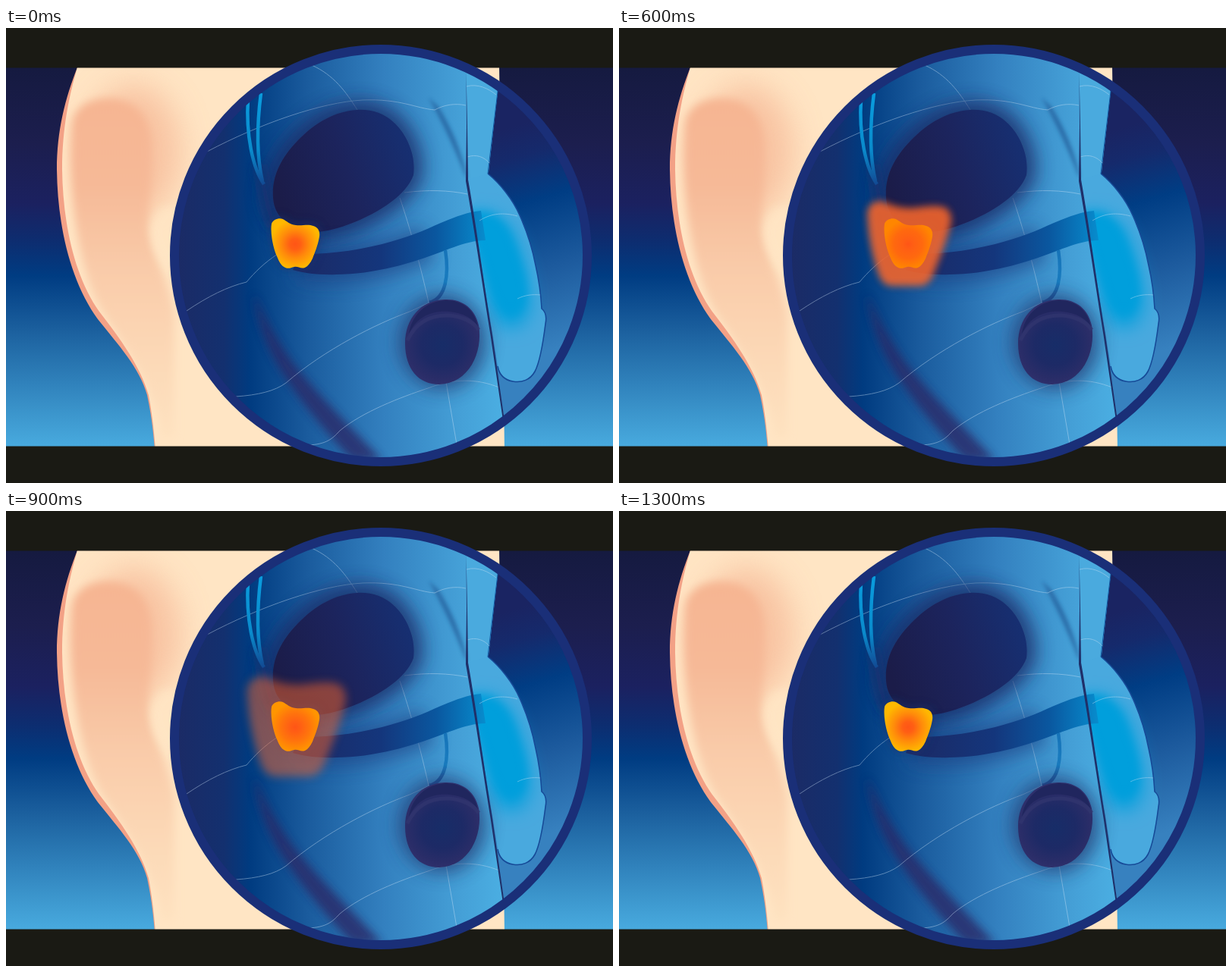
Animation, 800 px wide and 600 px high, one loop 1.4 s. Source, as an HTML page:

```html
<!DOCTYPE html>
<html lang="en">
<head>
<meta charset="utf-8">
<title>Pelvis cross-section</title>
<style>
  html, body { margin: 0; width: 100%; height: 100%; overflow: hidden; background: #1a1a14; }
  svg { display: block; width: 100vw; height: 100vh; }
  .mesh { fill: none; stroke: #cfe4f7; stroke-width: 1; opacity: .42; }
  .halo { transform-origin: 381px 284px; animation: spread 1400ms step-end infinite; }
  .rim { animation: rim 1400ms step-end infinite; }
  .mid { animation: mid 1400ms step-end infinite; }

  /* the halo grows for 700 ms, then fades at full size */
  @keyframes spread {
    0%       { transform: scale(.5);  opacity: 0; }
    7.1429%  { transform: scale(.5);  opacity: .1; }
    14.2857% { transform: scale(.5);  opacity: .2; }
    21.4286% { transform: scale(.52); opacity: .45; }
    28.5714% { transform: scale(.56); opacity: .72; }
    35.7143% { transform: scale(.7);  opacity: .82; }
    42.8571% { transform: scale(.85); opacity: .88; }
    50%      { transform: scale(1);   opacity: .9; }
    57.1429% { transform: scale(1);   opacity: .7; }
    64.2857% { transform: scale(1);   opacity: .5; }
    71.4286% { transform: scale(1);   opacity: .34; }
    78.5714% { transform: scale(1);   opacity: .2; }
    85.7143% { transform: scale(1);   opacity: .09; }
    92.8571%, 100% { transform: scale(1); opacity: 0; }
  }
  @keyframes rim {
    0%       { stop-color: #ffb800; animation-timing-function: steps(4); }
    28.5714% { stop-color: #ff8a00; animation-timing-function: steps(3); }
    50%      { stop-color: #ff8400; animation-timing-function: steps(6); }
    92.8571%, 100% { stop-color: #ffb800; }
  }
  @keyframes mid {
    0%       { stop-color: #ff8c0a; animation-timing-function: steps(4); }
    28.5714% { stop-color: #ff6a10; animation-timing-function: steps(3); }
    50%      { stop-color: #ff680e; animation-timing-function: steps(6); }
    92.8571%, 100% { stop-color: #ff8c0a; }
  }
</style>
</head>
<body>
<svg viewBox="0 0 800 600" preserveAspectRatio="none">
  <defs>
    <linearGradient id="sky" gradientUnits="userSpaceOnUse" x1="0" y1="52" x2="0" y2="551">
      <stop offset="0" stop-color="#151a40"/>
      <stop offset=".2" stop-color="#1c1e4e"/>
      <stop offset=".36" stop-color="#1b2160"/>
      <stop offset=".46" stop-color="#0d2d70"/>
      <stop offset=".55" stop-color="#003c82"/>
      <stop offset=".7" stop-color="#1c619f"/>
      <stop offset="1" stop-color="#48aade"/>
    </linearGradient>
    <linearGradient id="peach" gradientUnits="userSpaceOnUse" x1="0" y1="95" x2="0" y2="540">
      <stop offset="0" stop-color="#f6b592"/>
      <stop offset=".25" stop-color="#f6b997"/>
      <stop offset=".5" stop-color="#f9cba9"/>
      <stop offset=".75" stop-color="#fcd8b6"/>
      <stop offset="1" stop-color="#fee2c0"/>
    </linearGradient>
    <linearGradient id="outside" gradientUnits="userSpaceOnUse" x1="650" y1="135" x2="735" y2="420">
      <stop offset="0" stop-color="#1a2462"/>
      <stop offset=".14" stop-color="#152a6c"/>
      <stop offset=".34" stop-color="#003d84"/>
      <stop offset=".65" stop-color="#1d5b9e"/>
      <stop offset="1" stop-color="#3781bf"/>
    </linearGradient>
    <linearGradient id="inside" gradientUnits="userSpaceOnUse" x1="228" y1="0" x2="650" y2="0">
      <stop offset="0" stop-color="#1b2b66"/>
      <stop offset=".14" stop-color="#13306f"/>
      <stop offset=".22" stop-color="#003b80"/>
      <stop offset=".4" stop-color="#1a5b9d"/>
      <stop offset=".64" stop-color="#3380bf"/>
      <stop offset=".88" stop-color="#45a0d7"/>
      <stop offset="1" stop-color="#4aade1"/>
    </linearGradient>
    <linearGradient id="bladder" gradientUnits="userSpaceOnUse" x1="360" y1="220" x2="540" y2="160">
      <stop offset="0" stop-color="#1b1c49"/>
      <stop offset=".5" stop-color="#1c245d"/>
      <stop offset="1" stop-color="#163073"/>
    </linearGradient>
    <linearGradient id="tube" gradientUnits="userSpaceOnUse" x1="390" y1="0" x2="650" y2="0">
      <stop offset="0" stop-color="#1b2a66"/>
      <stop offset=".4" stop-color="#14367c"/>
      <stop offset=".68" stop-color="#0a579f"/>
      <stop offset=".88" stop-color="#0881c4"/>
      <stop offset="1" stop-color="#059cda"/>
    </linearGradient>
    <linearGradient id="duct" gradientUnits="userSpaceOnUse" x1="0" y1="95" x2="0" y2="206">
      <stop offset="0" stop-color="#0a9bdc"/>
      <stop offset=".6" stop-color="#0a8acb"/>
      <stop offset="1" stop-color="#124a93"/>
    </linearGradient>
    <linearGradient id="cord" gradientUnits="userSpaceOnUse" x1="0" y1="293" x2="0" y2="363">
      <stop offset="0" stop-color="#1673b8"/>
      <stop offset=".6" stop-color="#1a7dc0"/>
      <stop offset="1" stop-color="#1c4c93"/>
    </linearGradient>
    <radialGradient id="testis" gradientUnits="userSpaceOnUse" cx="575" cy="418" r="54">
      <stop offset="0" stop-color="#172d68"/>
      <stop offset=".5" stop-color="#1d2a66"/>
      <stop offset=".85" stop-color="#2a2d68"/>
      <stop offset="1" stop-color="#2e306c"/>
    </radialGradient>
    <radialGradient id="gland" gradientUnits="userSpaceOnUse" cx="381" cy="285" r="36">
      <stop offset="0" stop-color="#ff5516"/>
      <stop offset=".2" stop-color="#ff5f14"/>
      <stop class="mid" offset=".52" stop-color="#ff8c0a"/>
      <stop class="rim" offset=".9" stop-color="#ffb800"/>
    </radialGradient>

    <filter id="b1" filterUnits="userSpaceOnUse" x="0" y="0" width="800" height="600"><feGaussianBlur stdDeviation="2.4"/></filter>
    <filter id="b2" filterUnits="userSpaceOnUse" x="0" y="0" width="800" height="600"><feGaussianBlur stdDeviation="6"/></filter>
    <filter id="b3" filterUnits="userSpaceOnUse" x="0" y="0" width="800" height="600"><feGaussianBlur stdDeviation="12"/></filter>
    <filter id="b4" filterUnits="userSpaceOnUse" x="0" y="0" width="800" height="600"><feGaussianBlur stdDeviation="20"/></filter>

    <path id="skin" d="M94 52C84 87 74 130 74 187C75 255 89 326 123 374C151 410 177 446 188 484C192 505 195 530 197 556H657L650 48H95Z"/>
    <path id="bladderShape" d="M352 224C350 196 362 172 384 149C408 124 434 110 462 108C492 106 514 121 527 145C536 162 539 178 537 194C530 213 512 228 490 241C464 256 436 266 412 269C384 270 354 256 352 224Z"/>
    <path id="penisEdge" d="M635 192C651 205 668 226 677 247C687 269 694 292 698 313C703 335 705 352 706 370C711 374 713 380 711 390C708 414 704 440 697 453C691 464 680 468 668 466C657 464 650 458 648 446"/>
    <path id="tubeShape" d="M386 298C440 299 498 288 548 268C576 256 602 243 626 241L632 280C604 280 576 296 546 305C510 317 470 325 436 325C412 326 392 323 378 319Z"/>
    <path id="glandShape" d="M350 258C352 253 359 250 365 252C371 255 373 259 382 260C391 261 398 258 405 261C412 263 414 269 413 275C411 287 407 296 404 304C401 310 398 314 394 316C388 318 385 314 380 315C375 316 373 318 368 316C362 313 360 308 357 301C352 290 348 270 350 258Z"/>
    <clipPath id="skinClip"><use href="#skin"/></clipPath>
    <clipPath id="lens"><circle cx="494" cy="300" r="268"/></clipPath>
    <clipPath id="shaftClip"><path d="M614 236L640 190H730V480H652L640 405Z"/></clipPath>
  </defs>

  <rect width="800" height="600" fill="url(#sky)"/>

  <!-- torso -->
  <path fill="#f3a186" d="M95 48L94 52C78 93 67 135 67 187C68 262 85 334 121 384C148 418 176 448 186 484C191 507 194 530 196 556H400V48Z"/>
  <use href="#skin" fill="#ffe5c4"/>
  <g clip-path="url(#skinClip)">
    <ellipse cx="168" cy="162" rx="62" ry="88" fill="#f6b896" opacity=".75" filter="url(#b4)"/>
    <path fill="url(#peach)" filter="url(#b2)" d="M87 124C92 102 112 92 138 93C168 95 188 112 192 150C194 190 188 225 188 262C192 300 215 330 222 380V540H205C198 480 160 424 128 376C94 320 80 210 87 124Z"/>
    <path fill="#ffe5c4" opacity=".8" filter="url(#b2)" d="M208 236C186 252 186 294 218 324H270V236Z"/>
  </g>
  <path d="M0 0H800V52.5H0ZM0 551.5H800V600H0Z" fill="#1a1a14"/>

  <!-- magnified view -->
  <g clip-path="url(#lens)">
    <rect x="210" y="20" width="570" height="560" fill="url(#outside)"/>
    <path fill="url(#inside)" d="M210 20H652L648 84L636 190L608 200L656 512V580H210Z"/>
    <path fill="#4aaade" d="M606 20H652L648 84L635 193L608 201Z"/>
    <path d="M649 70L648 84L635 192" fill="none" stroke="#12569f" stroke-width="1"/>

    <path d="M557 92L570 104C586 130 600 160 608 198L604 192C592 160 574 122 557 92Z" fill="#205a96" opacity=".7" filter="url(#b1)"/>

    <!-- rectum -->
    <path d="M327 350C340 382 358 414 380 444C410 482 450 522 496 570H456C424 536 388 494 362 452C342 418 330 384 327 350Z" fill="#292c69" opacity=".82" filter="url(#b2)"/>

    <g class="mesh">
      <path d="M265 163C335 126 415 98 470 95C520 93 540 106 565 108C578 101 592 99 606 102"/>
      <path d="M403 49C432 62 448 84 463 108"/>
      <path d="M519 224C532 262 546 312 557 362"/>
      <path d="M525 217C556 213 584 214 608 219"/>
      <path d="M238 373C266 354 292 341 317 335C328 322 340 310 358 298"/>
      <path d="M303 486C332 484 354 479 369 468C420 424 488 390 532 374L558 362"/>
      <path d="M398 550C422 549 430 542 440 531C470 506 520 487 556 475C590 462 620 462 650 474"/>
      <path d="M580 467L594 549"/>
    </g>

    <!-- bladder and ureters -->
    <use href="#bladderShape" fill="#1c2a66" stroke="#1c2a66" stroke-width="24" opacity=".8" filter="url(#b3)"/>
    <path d="M334 180C338 205 344 230 352 262" fill="none" stroke="#15326f" stroke-width="14" opacity=".7" filter="url(#b2)"/>
    <g fill="none" stroke="url(#duct)" stroke-width="4.5">
      <path d="M319 94C316 140 325 185 340 206"/>
      <path d="M336 86C331 125 330 168 338 202"/>
    </g>
    <use href="#bladderShape" fill="url(#bladder)"/>

    <!-- penis and urethra -->
    <use href="#penisEdge" fill="#49a9de"/>
    <path d="M608 200L635 192L690 300L648 446Z" fill="#49a9de"/>
    <path d="M385 308C440 318 500 308 556 284" fill="none" stroke="#1a3a7e" stroke-width="48" opacity=".6" filter="url(#b3)"/>
    <path d="M600 250C630 238 656 246 670 276C684 312 694 352 688 376C680 396 664 400 650 388C638 370 632 350 626 314Z" fill="#009fdc" filter="url(#b3)" clip-path="url(#shaftClip)"/>
    <path d="M610 246C636 238 654 248 666 276C680 312 690 346 682 366C672 384 656 380 646 360C638 340 632 320 626 300Z" fill="#009fdc" filter="url(#b2)" clip-path="url(#shaftClip)"/>
    <use href="#tubeShape" fill="url(#tube)"/>
    <use href="#penisEdge" fill="none" stroke="#164a97" stroke-width="1.6"/>
    <g class="mesh">
      <path d="M607 77C622 73 636 80 646 88"/>
      <path d="M608 170C620 166 630 170 637 178"/>
      <path d="M624 254C640 244 656 243 674 248"/>
      <path d="M674 357C684 352 694 351 704 352"/>
    </g>
    <path d="M606.5 56L608 130L609 200C620 262 631 345 641 405L656.5 514L654.5 514L638.5 405C628 340 617 264 606 202L607 130Z" fill="#1f3069"/>

    <!-- testis -->
    <path d="M579 293C584 325 580 357 558 362" fill="none" stroke="url(#cord)" stroke-width="4.5"/>
    <ellipse cx="575" cy="414" rx="58" ry="63" fill="#24376f" opacity=".75" filter="url(#b3)"/>
    <path d="M526 416C526 384 546 359 578 358C602 357 618 370 623 392C629 428 610 469 571 470C544 470 526 450 526 416Z" fill="url(#testis)"/>
    <path d="M531 404C540 382 560 372 584 374C604 376 616 384 622 394C618 372 602 359 580 359C552 360 534 380 531 404Z" fill="#20265e"/>
    <path d="M529 412C540 388 560 378 584 379C604 381 616 388 623 398" fill="none" stroke="#33376f" stroke-width="5" opacity=".7"/>

    <!-- gland -->
    <use href="#glandShape" fill="#14306f" stroke="#14306f" stroke-width="6" opacity=".55" filter="url(#b2)"/>
    <path class="halo" fill="#f8662a" filter="url(#b2)" d="M318 244C315 226 328 215 344 220C358 226 372 230 390 229C406 227 424 224 437 228C448 233 450 246 446 258C440 282 428 312 420 332C415 344 409 350 397 350H357C345 350 339 343 335 331C326 306 319 272 318 244Z"/>
    <use href="#glandShape" fill="url(#gland)"/>
  </g>
  <circle cx="494" cy="300" r="272" fill="none" stroke="#1a2f78" stroke-width="12"/>
</svg>
</body>
</html>
```
